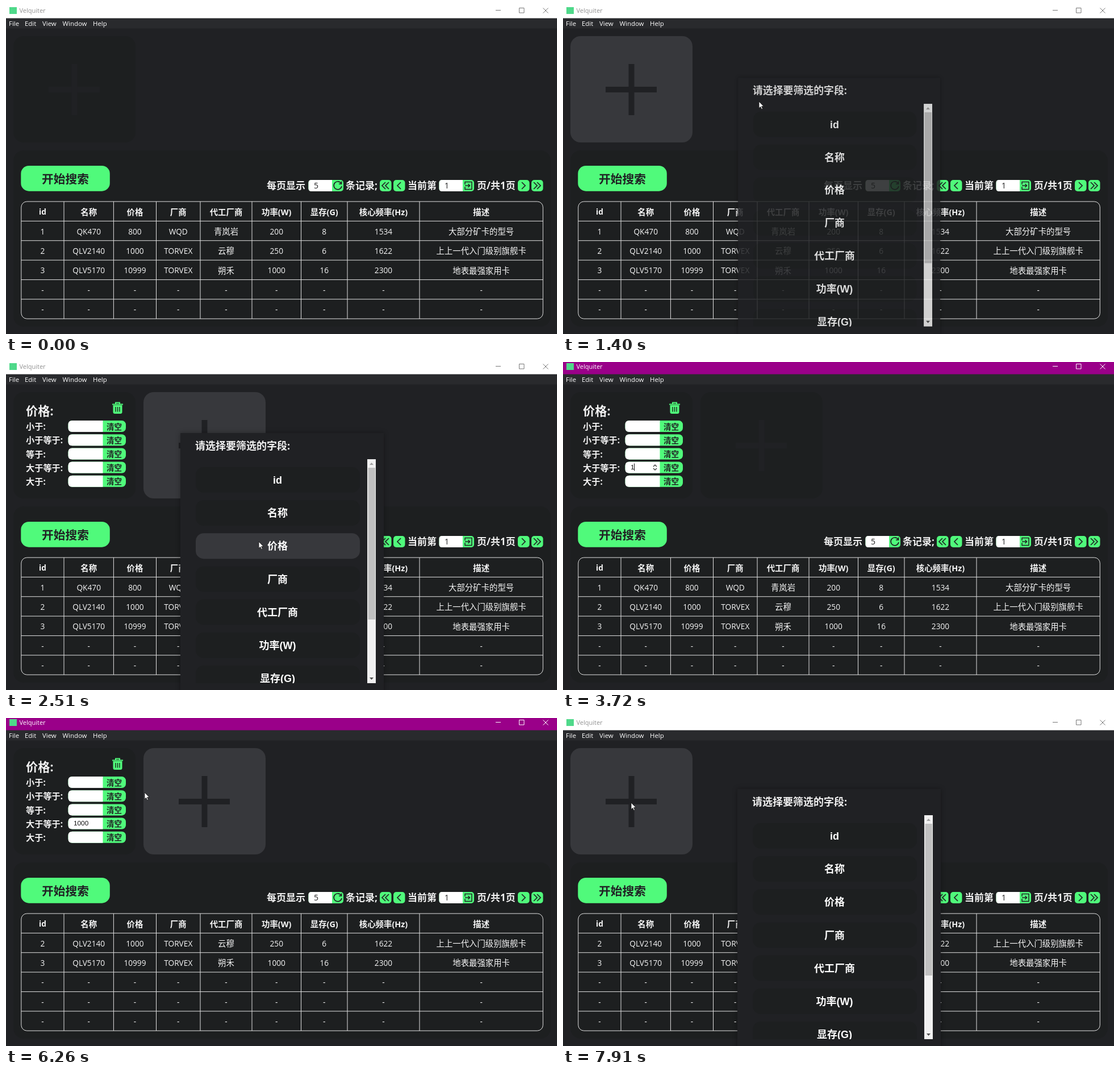
Recreate the animation shown at these times as an HTML page. Size 970x577 px, loop 8 s.

```html
<!DOCTYPE html>
<html lang="zh">
<head>
<meta charset="utf-8">
<title>Velquiter</title>
<style>
html, body { margin: 0; width: 100%; height: 100%; overflow: hidden; background: #202124; }
svg { display: block; width: 970px; height: 577px; }
text { font-family: 'Open Sans', 'Noto Sans CJK SC', 'Noto Sans CJK', sans-serif; white-space: pre; }
.arial { font-family: 'Liberation Sans', 'Noto Sans CJK SC', 'Noto Sans CJK', sans-serif; }
.b { font-weight: 700; }
</style>
</head>
<body>
<svg id="stage" viewBox="0 0 970 577"></svg>
<script>
const LOOP = 8000, STEP = 110, LEAD = 65;
const BG = '#202124', DARK = '#1d1f20', LIT = '#37383c', GREEN = '#50fa7b', PRESS = '#06b22f';
const COLS = [26.8, 102, 189.4, 264.5, 342, 433, 519.5, 601, 728, 945.3];
const TOP = 344, ROW = 34.36;
const HEAD = ['id', '名称', '价格', '厂商', '代工厂商', '功率(W)', '显存(G)', '核心频率(Hz)', '描述'];
const DATA = [
  ['1', 'QK470', '800', 'WQD', '青岚岩', '200', '8', '1534', '大部分矿卡的型号'],
  ['2', 'QLV2140', '1000', 'TORVEX', '云穆', '250', '6', '1622', '上上一代入门级别旗舰卡'],
  ['3', 'QLV5170', '10999', 'TORVEX', '朔禾', '1000', '16', '2300', '地表最强家用卡']
];

// Pointer path: step, x, y
const PATH = [
  [0, 420, 531], [2, 375, 420], [4, 270, 250], [5, 220, 180], [7, 187, 139],
  [10, 187, 139], [11, 260, 150], [12, 345, 168], [13, 395, 205], [14, 395, 205],
  [15, 412, 240], [17, 435, 290], [20, 445, 316], [23, 445, 316], [26, 330, 260],
  [29, 160, 195], [30, 144.5, 191.5], [38, 144.5, 191.5], [40, 150, 187], [42, 155, 212],
  [45, 133, 278], [46, 133, 289], [47, 133, 298], [52, 133, 298], [53, 205, 316],
  [54, 258, 321], [55, 258, 321], [56, 244, 131], [57, 224, 106], [59, 196, 80],
  [61, 196, 80], [65, 120, 149], [72, 120, 149]
];

function text(x, y, s, size, o = {}) {
  const { fill = '#fff', anchor = 'middle', cls = '' } = o;
  return `<text x="${x}" y="${y + size * .37}" font-size="${size}" fill="${fill}" text-anchor="${anchor}" class="${cls}">${s}</text>`;
}
function box(x, y, w, h, r, fill, more = '') {
  return `<rect x="${x}" y="${y}" width="${w}" height="${h}" rx="${r}" fill="${fill}" ${more}/>`;
}
function line(d, color, width = 1, more = '') {
  return `<path d="${d}" fill="none" stroke="${color}" stroke-width="${width}" ${more}/>`;
}
// Rectangle rounded on its left side only
function leftPill(x, y, w, h, r) {
  return `<path d="M${x + r} ${y}H${x + w}V${y + h}H${x + r}Q${x} ${y + h} ${x} ${y + h - r}V${y + r}Q${x} ${y} ${x + r} ${y}Z" fill="#fff"/>`;
}
const group = (id, body) => `<g id="${id}">${body}</g>`;
const bold = (anchor = 'middle', fill = '#fff') => ({ cls: 'b', anchor, fill });

function titleBar(id, back, ink, rule) {
  return group(id, box(0, 0, 970, 22, 0, back) + box(6, 2, 13, 12, 0, '#4fd98a')
    + text(23.5, 8.4, 'Velquiter', 11, { fill: ink, anchor: 'start' })
    + line('M862 7.5H871M903.5 3.5H912V12H903.5ZM945.5 3.5L954.5 12.5M954.5 3.5L945.5 12.5', rule));
}
function menu() {
  const items = { File: 5, Edit: 33, View: 64, Window: 99.5, Help: 153 };
  return box(0, 21.5, 970, 18, 0, '#292a2d')
    + Object.entries(items).map(([s, x]) => text(x, 31, s, 11.4, { anchor: 'start' })).join('');
}
function pager() {
  const ink = '#202124';
  const label = (x, s) => text(x, 316, s, 17, bold('start', '#f2f2f2'));
  const field = (x, s) => box(x, 306, 61.5, 20, 5, GREEN) + leftPill(x, 306, 41.5, 20, 5)
    + text(x + 13.5, 316, s, 14, { fill: '#222' });
  const arrow = (x, dir, twin) => {
    const tip = c => `M${c - 3 * dir} 310L${c + 3 * dir} 316L${c - 3 * dir} 322`;
    const d = twin ? tip(x + 7) + tip(x + 13) : tip(x + 10);
    return box(x, 306, 20.5, 20, 5, GREEN) + line(d, ink, 1.7);
  };
  return label(459, '每页显示') + field(532.5, '5')
    + line('M590 312A7 7 0 1 0 591 317M590.5 308.5V313H586', ink, 1.7)
    + label(598, '条记录;') + arrow(658, -1, true) + arrow(682, -1)
    + label(707, '当前第') + field(762.5, '1')
    + line('M808 314V309.5H820V322.5H808V318M808 316H816M813.5 313L816.5 316L813.5 319', ink, 1.5)
    + label(829, '页/共1页') + arrow(901, 1) + arrow(925, 1, true);
}
function grid() {
  const [left, right] = [COLS[0], COLS[9]], high = ROW * 6, color = '#e2e2e2';
  const cells = (row, r, cls) => row.map((s, i) => {
    const plain = /^[\w-]+$/.test(s);
    return text((COLS[i] + COLS[i + 1]) / 2, TOP + ROW * (r + .5) + 1, s, plain ? 13.7 : 14.4, { cls, fill: '#f6f6f6' });
  }).join('');
  const rows = list => [0, 1, 2, 3, 4].map(i => cells(list[i] || Array(9).fill('-'), i + 1, '')).join('');
  const d = COLS.slice(1, -1).map(x => `M${x} ${TOP}v${high}`).join('')
    + [1, 2, 3, 4, 5].map(i => `M${left} ${TOP + i * ROW}H${right}`).join('');
  return line(d, color) + box(left, TOP, right - left, high, 10, 'none', `stroke="${color}"`)
    + cells(HEAD, 0, 'b') + group('all', rows(DATA)) + group('some', rows(DATA.slice(1)));
}
function priceCard() {
  const names = ['小于:', '小于等于:', '等于:', '大于等于:', '大于:'];
  const rows = names.map((s, i) => {
    const y = 113.1 + i * 24.15;
    return text(35, y + .6, s, 15.2, bold('start', '#f2f2f2')) + box(109.5, y - 10, 101.5, 20, 7, GREEN)
      + leftPill(109.5, y - 10, 61, 20, 7)
      + text(190.5, y + .4, '清空', 13.6, bold('middle', '#202124'));
  }).join('');
  const bin = line('M187 74.5H206M193 74V71.5H200V74', GREEN, 2)
    + `<path d="M188.5 76H204.5V88Q204.5 91 201.5 91H191.5Q188.5 91 188.5 88Z" fill="${GREEN}"/>`
    + line('M193 79V87.5M196.5 79V87.5M200 79V87.5', DARK, 1.4);
  return group('price', box(13, 53, 215, 187, 18, DARK) + text(35, 86, '价格:', 21.2, bold('start', '#f2f2f2'))
    + bin + rows + text(119, 185, '', 11.8, { fill: '#111', anchor: 'start', cls: 'arial value' })
    + group('spin', line('M159 184L162 181L165 184M159 187L162 190L165 187', '#444', 1.5))
    + line('M0 178.5V191.5', '#111', 1, 'id="caret"'));
}
function dialog() {
  const items = HEAD.slice(0, 7).map((s, i) => {
    const y = 207.3 + i * 58.2;
    return box(334, y - 22.5, 289, 45, 14, DARK, 'class="item"')
      + text(478, y, s, 18, { cls: 'b arial' });
  }).join('');
  return group('dialog', box(307, 125, 358, 470, 0, BG, 'style="filter:drop-shadow(0 0 4px rgba(0,0,0,.35))"')
    + text(333, 147, '请选择要筛选的字段:', 18, bold('start', '#f0f0f0'))
    + `<clipPath id="view"><rect x="320" y="171" width="310" height="394"/></clipPath><g clip-path="url(#view)">${items}</g>`
    + box(636, 171, 15, 394, 0, '#f1f1f1') + box(637.5, 186, 12.5, 267, 0, '#c1c1c1')
    + '<path d="M640 181L643.5 177L647 181Z" fill="#a0a0a0"/><path d="M640 555L643.5 559L647 555Z" fill="#505050"/>');
}
function pointer() {
  return group('pointer',
    group('arrow', '<path d="M0 0V11.8L2.7 9.3L4.6 13.6L6.5 12.8L4.6 8.6H8.3Z" fill="#fff" stroke="#111" stroke-width=".8"/>')
    + group('ibeam', line('M-2 -6H2M0 -6V6M-2 6H2', '#222'))
    + group('busy', '<circle cx="10" cy="0" r="4.3" fill="none" stroke="#1c93f3" stroke-width="2.6"/>'));
}

const stage = document.getElementById('stage');
stage.innerHTML = box(0, 0, 970, 577, 0, BG) + titleBar('idle', '#fff', '#929292', '#777')
  + titleBar('active', '#9a0089', '#fff', '#fff') + menu()
  + group('adder', box(13, 53, 215, 187, 18, DARK, 'id="tile"')
    + box(75, 142, 90, 10, 0, BG) + box(115.5, 102, 10, 90, 0, BG))
  + priceCard() + box(13, 254, 946, 310, 18, DARK)
  + box(26.3, 281, 156.5, 44.7, 14, GREEN, 'id="search"') + text(104.5, 304.5, '开始搜索', 20.7, bold('middle', BG))
  + pager() + grid() + dialog() + pointer();

const $ = id => document.getElementById(id);
const items = [...document.querySelectorAll('.item')], value = document.querySelector('.value');
const show = (id, on) => $(id).style.display = on ? '' : 'none';
const within = (k, a, b) => k >= a && k < b;

function place(k) {
  const i = Math.max(1, PATH.findIndex(p => p[0] >= k));
  const [a, b] = [PATH[i - 1], PATH[i]], u = (k - a[0]) / (b[0] - a[0]);
  return [a[1] + (b[1] - a[1]) * u, a[2] + (b[2] - a[2]) * u];
}
function dialogAlpha(k) {
  if (k >= 69) k -= 58;
  return { 11: .35, 12: .85, 23: .4 }[k] ?? (within(k, 13, 23) ? 1 : 0);
}
function typed(k) {
  return k < 33 ? '' : k < 34 ? '1' : k < 35 ? '10' : k < 38 ? '100' : '1000';
}

function draw(time) {
  const k = Math.floor((time - LEAD) / STEP);
  const [x, y] = place(Math.max(0, k));
  const inBox = (l, t, r, b) => x >= l && x <= r && y >= t && y <= b;
  const alpha = dialogAlpha(k), card = within(k, 22, 62);
  const focus = within(k, 0, 10) || within(k, 23, 68);

  show('idle', !focus);
  show('active', focus);
  show('price', card);
  const left = card ? 229 : 0;
  $('adder').setAttribute('transform', `translate(${left} 0)`);
  const hover = within(k, 10, 24) || k >= 0 && inBox(13 + left, 53, 228 + left, 240);
  $('tile').setAttribute('fill', hover ? LIT : DARK);

  value.textContent = typed(k);
  show('spin', within(k, 29, 50));
  show('caret', within(k, 30, 49));
  $('caret').setAttribute('transform', `translate(${119 + typed(k).length * 6.5} 0)`);

  $('search').setAttribute('fill', inBox(27, 281, 183, 325) && k >= 45 ? PRESS : GREEN);
  show('all', k < 50);
  show('some', k >= 50);

  show('dialog', alpha > 0);
  const s = .96 + .04 * alpha;
  $('dialog').setAttribute('opacity', alpha);
  $('dialog').setAttribute('transform', `translate(486 350) scale(${s}) translate(-486 -350)`);
  items.forEach((el, i) => {
    const top = 184.8 + i * 58.2;
    el.setAttribute('fill', within(k, 13, 24) && inBox(334, top, 623, top + 45) ? LIT : DARK);
  });

  const beam = within(k, 29, 42) && inBox(110, 175, 170, 196);
  show('pointer', k >= 0 && !within(k, 31, 38));
  show('arrow', !beam);
  show('ibeam', beam);
  show('busy', within(k, 10, 12) || within(k, 68, 70));
  $('pointer').setAttribute('transform', `translate(${x} ${y})`);
}

const start = performance.now();
function tick() {
  draw((performance.now() - start) % LOOP);
  requestAnimationFrame(tick);
}
tick();
</script>
</body>
</html>
```
